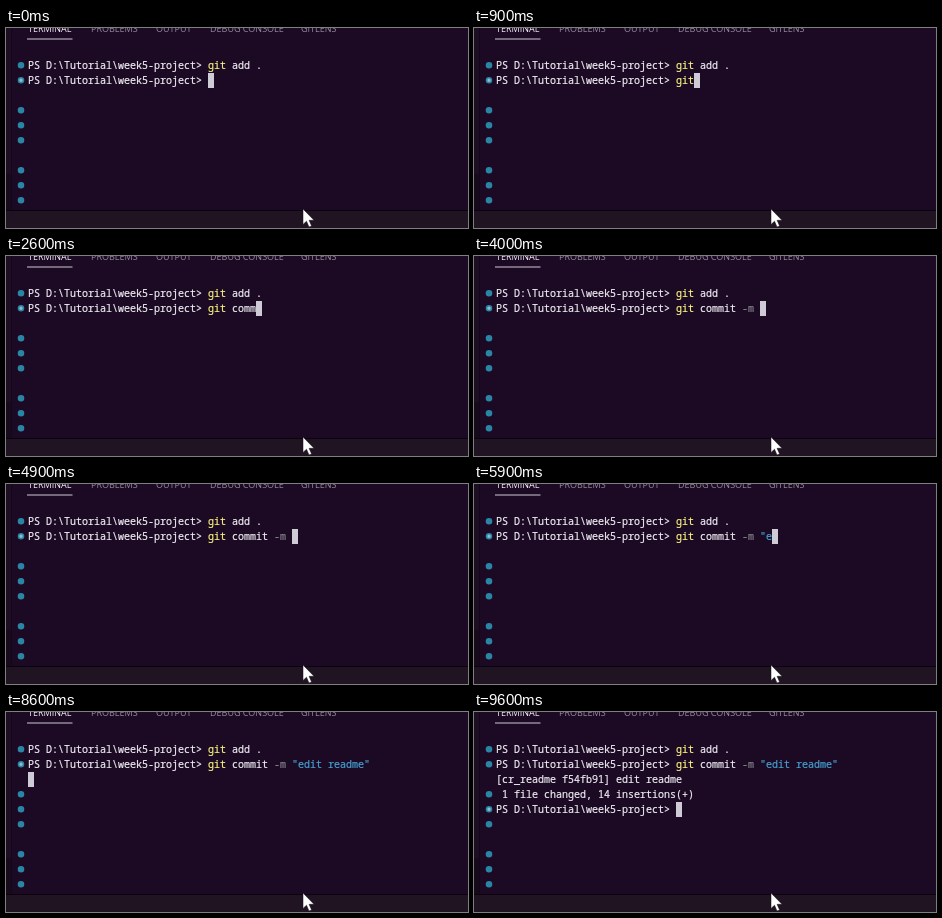
An HTML page for the animation above (9.7 s loop, 462 by 200 pixels).

```html
<!DOCTYPE html>
<html lang="en">
<head>
<meta charset="utf-8">
<title>Terminal commit</title>
<style>
  html, body { margin: 0; width: 100%; height: 100%; overflow: hidden; background: #1c0a24; }
  svg { display: block; width: 462px; height: 200px; }
  text { white-space: pre; }
  .code { font: 500 10px "Noto Sans Mono", "DejaVu Sans Mono", monospace; }
  .code text { fill: var(--ink, #eeecf2); stroke: var(--ink, #eeecf2); stroke-width: .2px; }
  .code .command { --ink: #f9f480; }
  .code .option { --ink: #85828d; }
  .code .string { --ink: #45a0d0; }
  .tab { font: 9px "Open Sans", "Noto Sans", sans-serif; fill: #94899a; }
  .tab.active { font-weight: 500; fill: #f2eff5; }
</style>
</head>
<body>
<svg viewBox="0 0 462 200">
  <rect width="462" height="200" fill="#1c0a24"/>
  <rect width="5" height="146" fill="#1d0e24"/>
  <rect y="146" width="5" height="36" fill="#160a1b"/>
  <path d="M5.5 0V182" stroke="#14071b"/>
  <rect y="182" width="462" height="18" fill="#211422"/>
  <path d="M0 182.5H462" stroke="#0b040f"/>
  <g id="tabs"></g>
  <path d="M21 11H66.500" stroke="#cfc6d4"/>
  <g id="dots"></g>
  <g id="lines" class="code"></g>
  <rect id="caret" width="6" height="15" fill="#cfcbd6"/>
  <path d="M297 181V196.5L300.5 193.2L303 199L305.6 197.9L303.1 192.3H308Z" fill="#fff" stroke="#160a1b" stroke-width=".5"/>
</svg>
<script>
const LOOP = 9700, ENTER = 8200, OUTPUT = 9000;
const LEFT = 22, CHAR = 6, ROW = 15, TOP = 30;
const PROMPT = 'PS D:\\Tutorial\\week5-project> ';
const START = PROMPT.length;
const $ = id => document.getElementById(id);

function add(parent, tag, attributes, text = '') {
  const node = document.createElementNS('http://www.w3.org/2000/svg', tag);
  for (const key in attributes) node.setAttribute(key, attributes[key]);
  node.textContent = text;
  return parent.appendChild(node);
}

function write(row, column, text, style = '') {
  return add($('lines'), 'text', {
    x: LEFT + column * CHAR, y: TOP + 11 + row * ROW, class: style
  }, text);
}

[['TERMINAL', 22], ['PROBLEMS', 85], ['OUTPUT', 150], ['DEBUG CONSOLE', 204], ['GITLENS', 295]]
  .forEach(([label, x], i) => add($('tabs'), 'text', { x, y: 4, class: i ? 'tab' : 'tab active' }, label));

const dots = [0, 1, 3, 4, 5, 7, 8, 9].map(row => ({
  row,
  node: add($('dots'), 'circle', {
    cx: 15, cy: TOP + 7.3 + row * ROW, r: 2.5, stroke: '#2a86a5', 'stroke-width': 1.6
  })
}));

write(0, 0, PROMPT);
write(0, START, 'git', 'command');
write(0, START + 4, 'add .');
write(1, 0, PROMPT);

const parts = [['git', 0, 'command'], ['commit', 4, ''], ['-m', 11, 'option'], ['"edit readme"', 14, 'string']]
  .map(([text, column, style]) => ({ text, column, node: write(1, START + column, '', style) }));

const output = [
  write(2, 0, '[cr_readme f54fb91] edit readme'),
  write(3, 0, ' 1 file changed, 14 insertions(+)'),
  write(4, 0, PROMPT)
];

// One time per keystroke of the commit command
const keys = [
  500, 700, 900, 1300, 1600, 1900, 2200, 2500, 2800, 3000, 3300, 3600, 3800, 4000,
  5000, 5700, 6100, 6200, 6300, 6500, 6600, 6700, 6800, 6900, 7100, 7200, 7400
];

function draw(now) {
  const t = now % LOOP;
  const done = t >= OUTPUT;
  const typed = keys.filter(time => time <= t).length;

  for (const { text, column, node } of parts)
    node.textContent = text.slice(0, Math.max(0, typed - column));
  for (const node of output) node.setAttribute('visibility', done ? 'visible' : 'hidden');
  for (const { row, node } of dots)
    node.setAttribute('fill', row === (done ? 4 : 1) ? '#8dbccb' : '#2a86a5');

  const [row, column] = done ? [4, START] : t >= ENTER ? [2, 0] : [1, START + typed];
  $('caret').setAttribute('x', LEFT + column * CHAR);
  $('caret').setAttribute('y', TOP + row * ROW);
  requestAnimationFrame(() => draw(performance.now()));
}

draw(performance.now());
</script>
</body>
</html>
```
